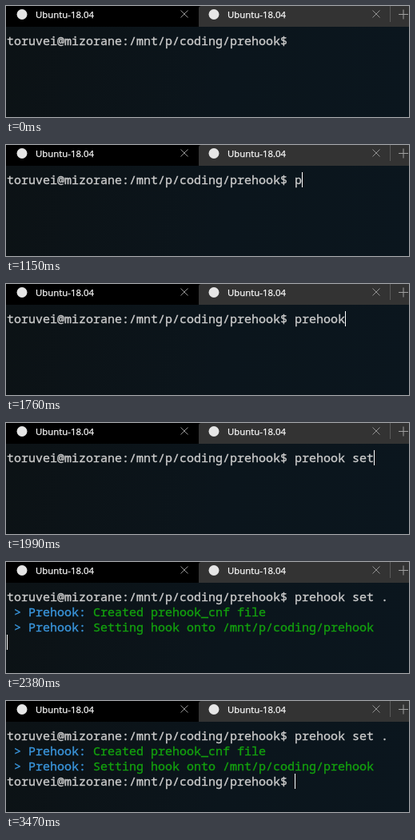
An HTML page that plays this animation: 504 by 139 pixels, repeating every 3780 ms.

```html
<!DOCTYPE html>
<html lang="en">
<head>
<meta charset="utf-8">
<title>Terminal</title>
<style>
  html, body { margin: 0; width: 100%; height: 100%; overflow: hidden; background: #0b1317; }
  #stage {
    position: relative; width: 504px; height: 139px; overflow: hidden;
    background: linear-gradient(100deg, #0c1215, #0b151c 55%, #0b161e);
  }
  #bar { position: absolute; left: 0; top: 0; display: block; }
  #bar text {
    font: 11.4px "Open Sans", "Noto Sans", sans-serif;
    fill: #fff; stroke: #fff; stroke-width: .25px;
  }
  .row, #cursor { position: absolute; height: 19px; }
  .row {
    left: 1px; white-space: pre; color: #ccc;
    font: 15px/19px "Noto Sans Mono", "DejaVu Sans Mono", monospace;
    font-variant-ligatures: none; -webkit-text-stroke: .35px currentColor;
  }
  .tag { color: #3a96dd; }
  .info { color: #13a10e; }
  #cursor { width: 1px; background: #fff; }
</style>
</head>
<body>
<div id="stage">
  <svg id="bar" width="504" height="26" viewBox="0 0 504 26">
    <defs>
      <g id="tab">
        <circle cx="20" cy="10.5" r="6.5" fill="#e6e6e6"/>
        <text x="37" y="15">Ubuntu-18.04</text>
        <path d="M218.5 5.5l9 9m0-9l-9 9" stroke="#929292"/>
      </g>
    </defs>
    <rect width="504" height="26" fill="#000"/>
    <path d="M241 26V3q0-3 3-3H504v26z" fill="#333"/>
    <use href="#tab"/>
    <use href="#tab" x="240"/>
    <path d="M480.5 0v20" stroke="#5a5a5a"/>
    <path d="M491 10.5h12m-6-6v12" fill="none" stroke="#a0a0a0"/>
  </svg>
  <div id="cursor"></div>
</div>
<script>
const LOOP = 3780, BLINK = 540, CELL = 9, LINE = 19, LEFT = 1, TOP = 34;
const PROMPT = "toruvei@mizorane:/mnt/p/coding/prehook$ ";
const END = PROMPT.length;

// Keys struck in each screen tick; empty parts are pauses
const KEYS = "p|r|eh||o||o||k| |se|t| |.".split("|");
const TYPING = 1141, TICK = 77;
const FOCUS = 370, ENTER = 2300, REPLY = 2380, READY = 2610;

const stage = document.getElementById("stage");
const cursor = document.getElementById("cursor");

function addRow(index, parts) {
  const row = document.createElement("div");
  row.className = "row";
  row.style.top = TOP + index * LINE + "px";
  for (const [text, kind] of parts) {
    const span = document.createElement("span");
    span.className = kind;
    span.textContent = text;
    row.append(span);
  }
  stage.insertBefore(row, cursor);
  return row;
}

const message = text => [[" > Prehook: ", "tag"], [text, "info"]];
const input = addRow(0, [[PROMPT, ""], ["", ""]]).lastChild;
const replies = [
  addRow(1, message("Created prehook_cnf file")),
  addRow(2, message("Setting hook onto /mnt/p/coding/prehook"))
];
const nextPrompt = addRow(3, [[PROMPT, ""]]);

const show = (el, on) => { el.style.visibility = on ? "visible" : "hidden"; };
const blinkOn = (time, since) => Math.floor((time - since) / BLINK) % 2 === 0;

function cursorOn(time) {
  if (time < TYPING) return blinkOn(time, FOCUS);
  return time < REPLY || blinkOn(time, REPLY);
}

function cursorCell(time, typed) {
  if (time >= READY) return [END, 3];
  if (time >= REPLY) return [0, 3];
  if (time >= ENTER) return [0, 1];
  return [END + typed, 0];
}

function draw(time) {
  const ticks = Math.max(0, Math.floor((time - TYPING) / TICK) + 1);
  const typed = KEYS.slice(0, ticks).join("");
  input.textContent = typed;
  replies.forEach(row => show(row, time >= REPLY));
  show(nextPrompt, time >= READY);

  const [column, row] = cursorCell(time, typed.length);
  cursor.style.left = LEFT + column * CELL + "px";
  cursor.style.top = TOP + row * LINE + "px";
  show(cursor, cursorOn(time));
}

const start = performance.now();
function tick() {
  draw((performance.now() - start) % LOOP);
  requestAnimationFrame(tick);
}
tick();
</script>
</body>
</html>
```
